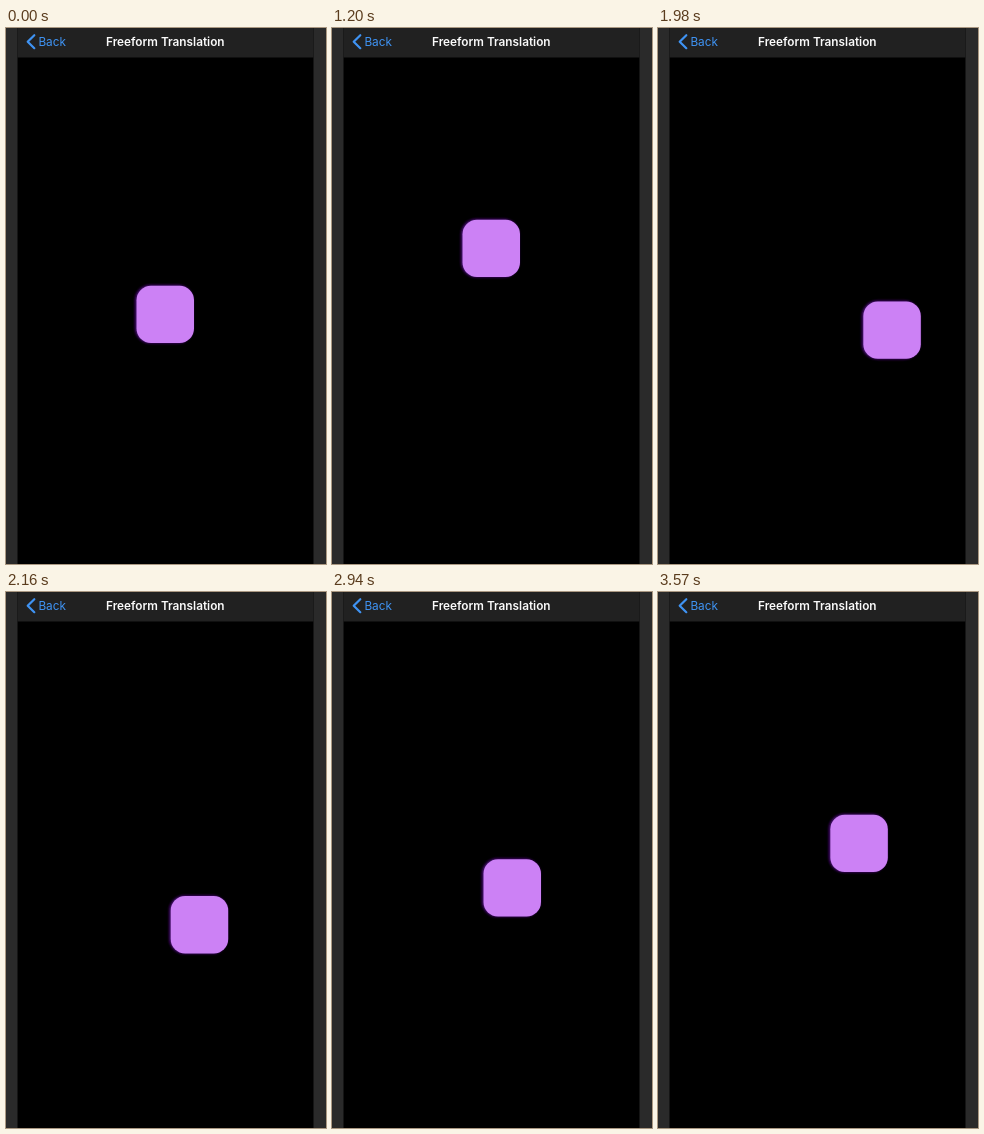
Animation, 320 px wide and 536 px high, one loop 3600 ms. Source, as an HTML page:

```html
<!DOCTYPE html>
<html lang="en">
<head>
<meta charset="utf-8">
<title>Freeform Translation</title>
<style>
  html, body { margin: 0; width: 100%; height: 100%; overflow: hidden; background: #000; }
  svg { display: block; width: 100vw; height: 100vh; }
  text { font-family: Inter, "Liberation Sans", sans-serif; }
</style>
</head>
<body>
<svg viewBox="0 0 320 536">
  <defs>
    <filter id="glow" x="-20%" y="-20%" width="140%" height="140%">
      <feGaussianBlur stdDeviation="0.9"/>
    </filter>
    <filter id="soft" x="-10%" y="-10%" width="120%" height="120%">
      <feGaussianBlur stdDeviation="0.35"/>
    </filter>
  </defs>
  <rect width="320" height="536" fill="#2a2a2a"/>
  <rect x="11.5" width="296" height="536" fill="#000"/>
  <rect x="11.5" width="296" height="29.5" fill="#212121"/>
  <path d="M28.3 7.2 L21.7 13.7 L28.3 20.2" fill="none" stroke="#3f93f3" stroke-width="2.2" stroke-linecap="round" stroke-linejoin="round"/>
  <text x="32.4" y="18" font-size="11.8" fill="#3f93f3">Back</text>
  <text x="159.3" y="18" font-size="11.8" font-weight="600" text-anchor="middle" fill="#fafafa">Freeform Translation</text>
  <g id="box">
    <rect x="-1.2" y="-0.7" width="58.6" height="58.8" rx="15.5" fill="#42096a" filter="url(#glow)"/>
    <rect x="0.5" y="0.2" width="57.5" height="57.3" rx="14.5" fill="#cc81f5" filter="url(#soft)"/>
  </g>
</svg>
<script>
const LOOP = 3600, STEP = 30;

// Drag: key points as time in ms, left, top
const drag = [
  [930, 130, 257.5], [1300, 130, 177], [1470, 121, 183],
  [1770, 49, 232], [1970, 206, 271], [2010, 196, 280],
  [2520, 117, 336], [2940, 151, 267], [3040, 182, 196]
];
const last = drag.length - 1;

// Release: damped swing around the resting place
const rest = [0, 172, 222], HALF = 185, DECAY = 0.0075;

// Slope at a key point: zero where the axis turns, else a weighted harmonic mean
function slope(i, axis) {
  if (i === 0 || i === last) return 0;
  const [a, b, c] = [drag[i - 1], drag[i], drag[i + 1]];
  const h0 = b[0] - a[0], h1 = c[0] - b[0];
  const d0 = (b[axis] - a[axis]) / h0, d1 = (c[axis] - b[axis]) / h1;
  if (d0 * d1 <= 0) return 0;
  const w0 = 2 * h1 + h0, w1 = h1 + 2 * h0;
  return (w0 + w1) / (w0 / d0 + w1 / d1);
}

function place(t, axis) {
  if (t <= drag[0][0]) return drag[0][axis];
  const s = t - drag[last][0];
  if (s >= 0) {
    const swing = Math.exp(-DECAY * s) * Math.cos(Math.PI * s / HALF);
    return rest[axis] + (drag[last][axis] - rest[axis]) * swing;
  }
  const i = drag.findIndex(p => p[0] > t) - 1;
  const a = drag[i], b = drag[i + 1], h = b[0] - a[0];
  const u = (t - a[0]) / h, v = 1 - u;
  return a[axis] * v * v * (1 + 2 * u) + b[axis] * u * u * (1 + 2 * v)
    + h * u * v * (slope(i, axis) * v - slope(i + 1, axis) * u);
}

const box = document.getElementById("box");

function draw(now) {
  const t = Math.floor((now % LOOP) / STEP + 1e-6) * STEP;
  box.setAttribute("transform", `translate(${place(t, 1).toFixed(2)} ${place(t, 2).toFixed(2)})`);
}

let start = null;
function tick(now) {
  if (start === null) start = now;
  draw(now - start);
  requestAnimationFrame(tick);
}
draw(0);
requestAnimationFrame(tick);
</script>
</body>
</html>
```
